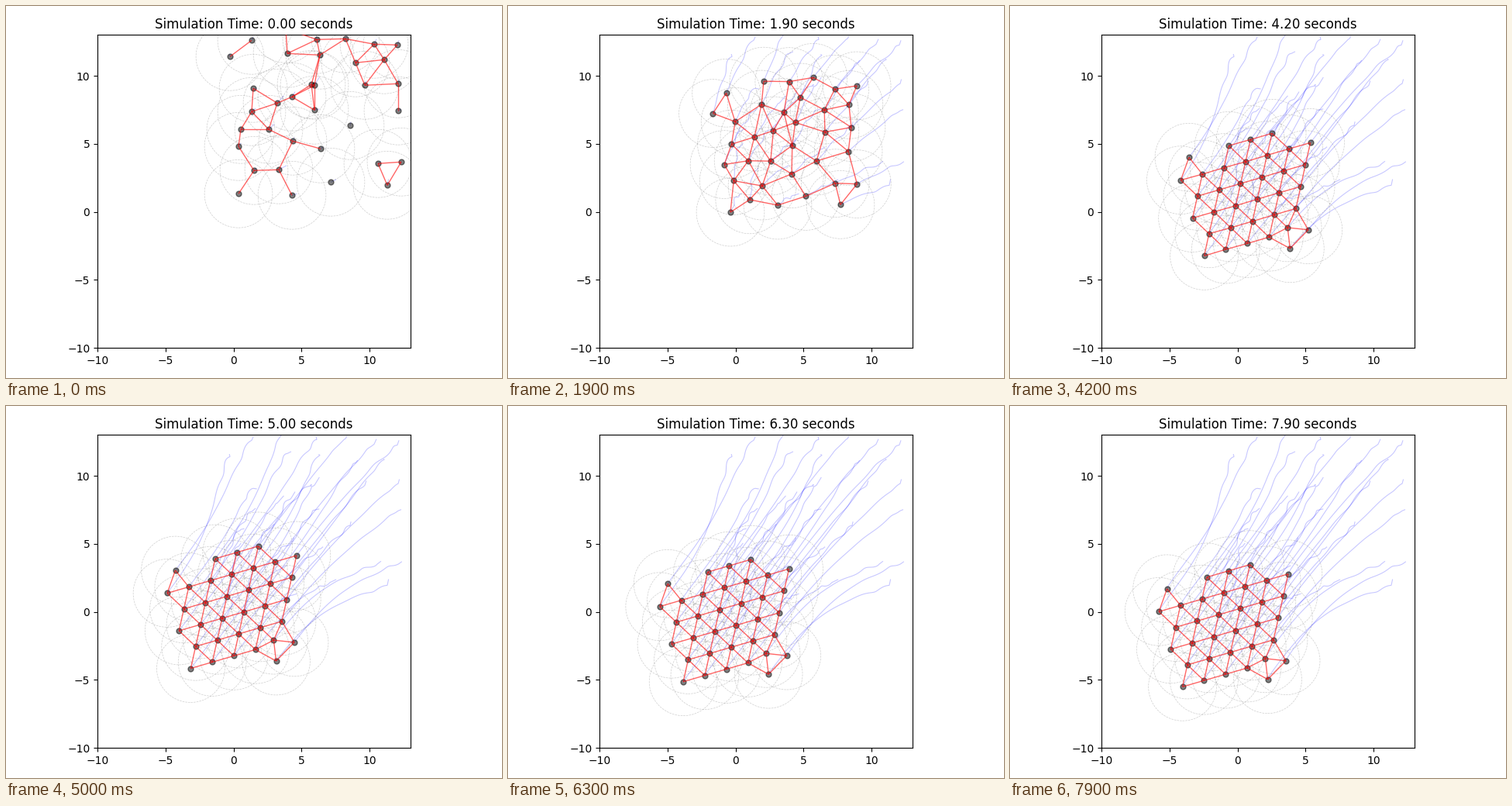
Animation, 640 px wide and 480 px high, one loop 8000 ms. Source, as a matplotlib script:

```python
import numpy as np
import matplotlib.pyplot as plt
from matplotlib.animation import FuncAnimation
from matplotlib.collections import LineCollection
from numpy.polynomial import Polynomial

FRAMES, STEP = 80, 0.1
SUB = 5                      # trail samples per frame
REACH = 2.5                  # sensing radius and link length
SCALE = 404 / 23             # pixels per unit
rng = np.random.default_rng(4)

# Scattered starting points in stage pixels, one line per lattice row.
START = np.array("""
317 44 361 29 401 43 438 42
289 65 319 106 363 61 394 101 405 63 475 49 505 50
317 136 350 125 369 117 398 102 451 73 488 69
303 159 339 159 370 174 398 134 463 102 506 100
300 181 352 211 406 184 444 154 506 135
300 242 320 212 369 244 419 227 480 203 510 201
492 231""".split(), float).reshape(-1, 2)

# Final formation: a skewed hexagonal lattice with a loose corner.
ROWS = {-2: (-3.85, -2, -1, 0), -1: range(-4, 3), 0: range(-3, 3),
        1: range(-3, 3), 2: range(-2, 3), 3: range(-2, 2)}
CORNER = [(1.8, 2.8), (2.85, 3.2), (2.15, 3.85)]
cells = np.array([(i, j) for j, row in ROWS.items() for i in row] + CORNER)
REST = (297, 261) + cells @ np.array([(27.8, -8.1), (-6.3, 28.3)])

# The flock's distance from its resting place: a smooth curve through key points.
TIMES = [0, 1.9, 3.1, 4.2, 5.0, 6.3, 7.2, 7.9]
shift_x = Polynomial.fit(TIMES, [117, 80, 51, 28.5, 16, 3.5, 0.5, 0], 5)
shift_y = Polynomial.fit(TIMES, [-151, -108, -70, -40, -24, -6.5, -1, 0], 5)


def shift(t):
    return np.stack([shift_x(t), shift_y(t)], axis=-1)


def positions(t):
    """All agents at times t: each one's scatter dies away as the flock moves."""
    scatter = START - REST - shift(0.0)
    phase = rng.uniform(0, 2 * np.pi, START.shape)
    s = t[:, None, None]
    wobble = 4 * s * np.exp(-s ** 2) * np.sin(6 * s + phase)
    return REST + shift(t)[:, None] + scatter * np.exp(-(s / 1.95) ** 2) + wobble


samples = np.arange((FRAMES - 1) * SUB + 1) * STEP / SUB
tail = START + rng.normal((4, -4), 3, START.shape)
paths = np.concatenate([tail[None], positions(samples)])
paths = (paths - (293.65, 265.4)) / (SCALE, -SCALE)

fig, ax = plt.subplots(figsize=(6.4, 4.8), dpi=100)
ax.set_aspect("equal")
ax.set(xlim=(-10, 13), ylim=(-10, 13))
title = ax.set_title("Simulation Time: 0.00 seconds")
fig.tight_layout()

trails = LineCollection([], colors="blue", linewidths=0.8, alpha=0.22, zorder=1)
ranges = LineCollection([], colors="gray", linewidths=0.5, alpha=0.38,
                        linestyles="--", zorder=1)
links = LineCollection([], colors="red", linewidths=1, alpha=0.6, zorder=3)
for c in (trails, ranges, links):
    ax.add_collection(c, autolim=False)
dots = ax.scatter(*paths[1].T, s=25, c="black", alpha=0.5, zorder=2)

angle = np.linspace(-np.pi / 2, 1.5 * np.pi, 73)
RING = REACH * np.column_stack([np.cos(angle), np.sin(angle)])
PAIRS = np.array(np.triu_indices(len(START), 1)).T


def update(frame):
    last = frame * SUB + 1
    pos = paths[last]
    ends = pos[PAIRS]
    near = np.hypot(*(ends[:, 0] - ends[:, 1]).T) < REACH
    trails.set_segments(list(paths[:last + 1].swapaxes(0, 1)))
    ranges.set_segments(list(pos[:, None] + RING))
    links.set_segments(list(ends[near]))
    dots.set_offsets(pos)
    title.set_text(f"Simulation Time: {frame * STEP:.2f} seconds")
    return trails, ranges, links, dots, title


anim = FuncAnimation(fig, update, frames=FRAMES, interval=100,
                     repeat=True, repeat_delay=0, blit=False)
plt.show()
```
